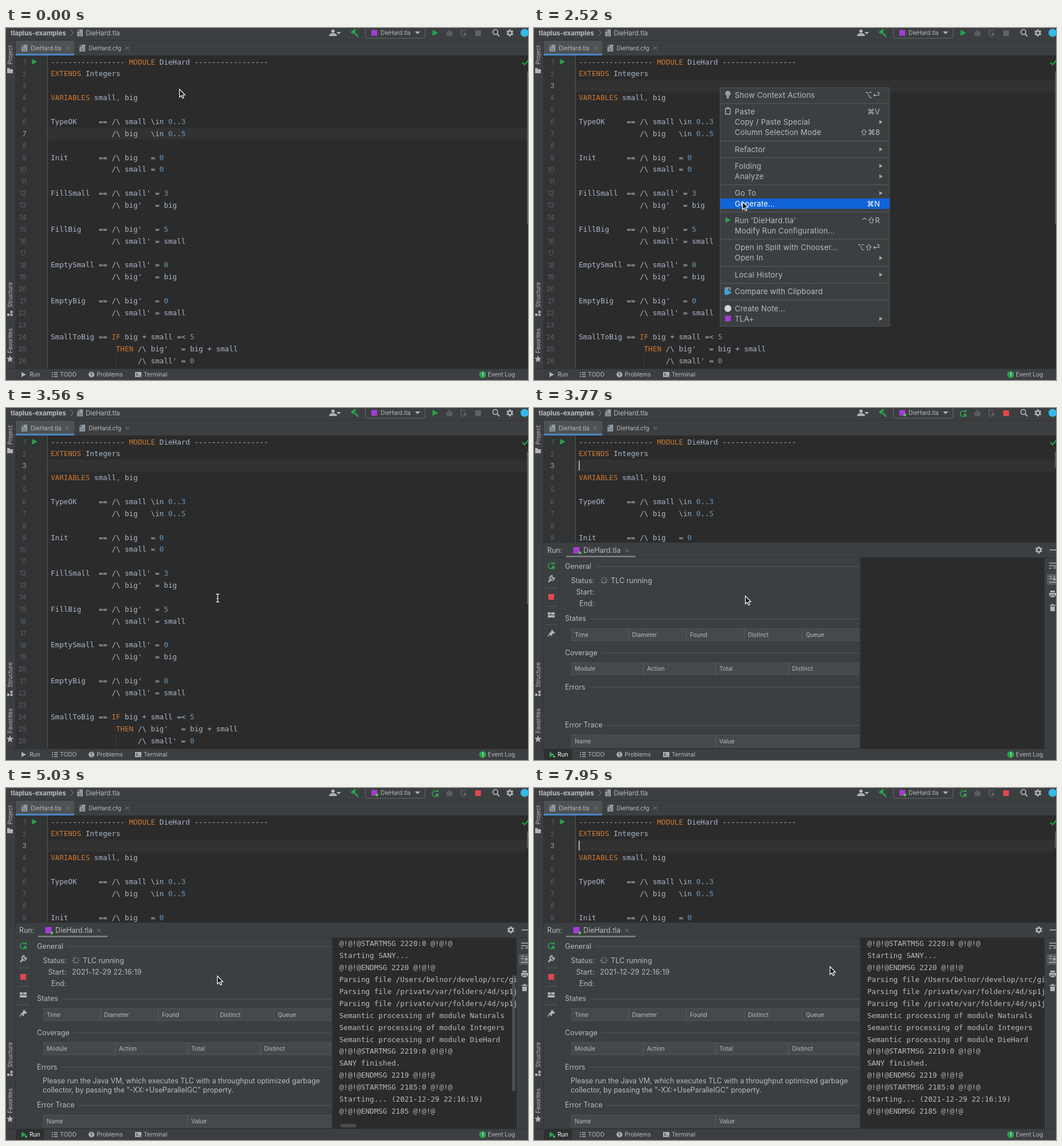
These frames come from a looping animation (910 by 615 pixels, 8 s). An HTML page:

```html
<!DOCTYPE html>
<html lang="en">
<head>
<meta charset="utf-8">
<title>TLA+ run</title>
<style>
html,body{margin:0;width:100%;height:100%;overflow:hidden;background:#3c3f41}
svg{display:block}
text{white-space:pre;font-family:Inter,'DejaVu Sans',sans-serif;fill:#bbbbbb}
.code,.code tspan{font-family:'DejaVu Sans Mono',monospace;font-size:12.6px;font-variant-ligatures:none}
</style>
</head>
<body>
<svg id="stage" width="910" height="615" viewBox="0 0 910 615" xmlns="http://www.w3.org/2000/svg"></svg>
<script>
const LOOP = 8000, STEP = 209.3, PITCH = 20.88;
const BG = '#2b2b2b', PANEL = '#3c3f41', EDGE = '#323232', RULE = '#55585a', ICON = '#afb1b3';
const GREEN = '#28a14e', RED = '#e0474c', DIM = '#5f6264', MARK = '#a53bd6';

const esc = s => s.replace(/&/g, '&amp;').replace(/</g, '&lt;');
const rect = (x, y, w, h, fill, extra = '') =>
  `<rect x="${x}" y="${y}" width="${w}" height="${h}" fill="${fill}" ${extra}/>`;
const fill = (d, color) => `<path d="${d}" fill="${color}"/>`;
const line = (d, color = ICON, w = 1.3) =>
  `<path d="${d}" fill="none" stroke="${color}" stroke-width="${w}"/>`;
const circle = (x, y, r, color) => `<circle cx="${x}" cy="${y}" r="${r}" fill="${color}"/>`;
const ring = (x, y, r, color = ICON, w = 1.4) =>
  `<circle cx="${x}" cy="${y}" r="${r}" fill="none" stroke="${color}" stroke-width="${w}"/>`;
// y is the middle of the capitals
const label = (x, y, s, size, color = '#bbbbbb', extra = '') =>
  `<text x="${x}" y="${(y + size * .36).toFixed(2)}" font-size="${size}" style="fill:${color}" ${extra}>${esc(s)}</text>`;
const group = (id, body, extra = '') => `<g id="${id}" ${extra}>${body}</g>`;
const at = (x, y, body) => `<g transform="translate(${x} ${y})">${body}</g>`;
const rowY = n => 59 + (n - 1) * PITCH;

const play = (x, y, s = 5) => fill(`M${x - s} ${y - s - .5}L${x + s} ${y}L${x - s} ${y + s + .5}Z`, GREEN);
const rerun = (x, y) => at(x, y,
  line('M4-2A5 5 0 1 0 4 4', GREEN, 1.7) + fill('M1-2H6V-7Z', GREEN) + rect(1, 1, 5, 5, GREEN));
const cross = (x, y) => line(`M${x - 3} ${y - 3}l6 6m0-6l-6 6`, '#7d8082', 1);
const page = (x, y) => at(x, y,
  fill('M-1-6H5V6H-5V-2H-1Z', '#8f9ba3') + fill('M-5-3L-2-6V-3Z', '#8f9ba3') +
  line('M-3 1H3M-3 3.5H3', '#59636a', 1));
const mark = (x, y, s) => rect(x - s / 2, y - s / 2, s, s, MARK);
const gear = (x, y) => at(x, y, ring(0, 0, 3.5, ICON, 2.6) +
  [0, 60, 120].map(a => `<path d="M0-6.2V-4M0 4V6.2" stroke="${ICON}" stroke-width="2.6" transform="rotate(${a})"/>`).join(''));

const source = `----------------- MODULE DieHard -----------------
EXTENDS Integers

VARIABLES small, big

TypeOK     == /\\ small \\in 0..3
              /\\ big   \\in 0..5

Init       == /\\ big   = 0
              /\\ small = 0

FillSmall  == /\\ small' = 3
              /\\ big'   = big

FillBig    == /\\ big'   = 5
              /\\ small' = small

EmptySmall == /\\ small' = 0
              /\\ big'   = big

EmptyBig   == /\\ big'   = 0
              /\\ small' = small

SmallToBig == IF big + small =< 5
               THEN /\\ big'   = big + small
                    /\\ small' = 0`.split('\n');

const tint = (s, color) => `<tspan style="fill:${color}">${s}</tspan>`;
const paint = s => esc(s).replace(/\d|\b(MODULE|EXTENDS|VARIABLES|IF|THEN)\b|,/g,
  m => tint(m, /\d/.test(m) ? '#6897bb' : '#cc7832'));
const codeText = (x, y, html, color) =>
  `<text class="code" x="${x}" y="${(y + 4.5).toFixed(2)}" style="fill:${color}">${html}</text>`;

function editor() {
  let s = rect(17, 48, 893, 548, BG) + rect(17, 48, 55, 548, '#313335') +
    group('row', rect(73, -10.4, 835, 20.9, EDGE)) + rect(72, 48, 1, 548, '#55585a');
  source.forEach((text, i) => {
    const y = rowY(i + 1);
    s += label(35.5, y + .5, String(i + 1), 11.5, '#606366', 'class="num" text-anchor="end"');
    s += codeText(78, y, paint(text), '#a9b7c6');
  });
  return s + play(50, 59, 4.5) + rect(191, 571, 1, 21, '#3b3d3e') +
    line('M900 60l4 4 7-8', GREEN, 2.2) + group('thumb', rect(908, 76, 2, 267, '#55585a')) +
    group('caret', rect(78, 92, 1.5, 17, '#d0d0d0'));
}

function topBar() {
  const bug = ring(773, 10, 3.4, DIM, 2.6) + line('M767 6l12 8m0-8l-12 8M767 10h12M771 3l2 3 2-3', DIM, 1);
  return rect(0, 0, 910, 48, PANEL) + rect(0, 21, 910, 1, EDGE) +
    label(8, 8.5, 'tlaplus-examples', 11.4, '#bbbbbb', 'font-weight="650"') +
    line('M113 3l4 5.5-4 5.5', '#85888a', 1) + page(129, 8.5) + label(139, 8.5, 'DieHard.tla', 11.3) +
    circle(570, 5.5, 3, ICON) + fill('M563 14q0-5 7-5t7 5Z', ICON) + fill('M576 7h8l-4 4Z', ICON) +
    fill('M601 7l6-5 4 1-3 4 7 7-2 2-7-7-2 2Z', GREEN) +
    rect(626.5, -4, 104, 22, PANEL, 'stroke="#65686a" rx="3"') + mark(642, 8.5, 10) +
    label(653, 8.5, 'DieHard.tla', 10) + fill('M713 6h9l-4.5 5Z', ICON) + bug +
    line('M802 4H793V9q0 4 4 6', DIM, 1.6) + fill('M798 7l6 4-6 4Z', DIM) +
    group('idle', play(748.5, 8.5, 5) + rect(818, 4, 10, 10, DIM)) +
    group('busy', rerun(748, 9) + rect(818, 4, 10, 10, RED) + circle(646.5, 12, 2.5, '#4cc24c')) +
    ring(853, 7, 4.3, ICON, 1.7) + line('M856 10l4 4.5', ICON, 2) + gear(878.5, 8.5) +
    circle(904, 8.5, 7, '#35b9e6') +
    rect(17, 22, 102, 26, '#4e5254') + rect(17, 45, 102, 3, '#4a88c7') +
    page(32, 35) + label(43, 35.5, 'DieHard.tla', 10.2) + cross(107, 35) +
    page(133, 35) + label(144, 35.5, 'DieHard.cfg', 10.1) + cross(211.5, 35);
}

function sideBar() {
  const side = (s, y) => at(7, y, `<g transform="rotate(-90)">${label(0, 0, s, 10.1, '#bbbbbb', 'text-anchor="middle"')}</g>`);
  return rect(0, 22, 17, 574, PANEL) + rect(16, 22, 1, 574, EDGE) +
    side('Project', 47) + fill('M2 70h4l1 2h5v7H2Z', ICON) +
    side('Structure', 466) + rect(2, 499, 4, 4, ICON) + rect(7.5, 499, 4, 4, ICON) + rect(7.5, 494, 4, 4, ICON) +
    side('Favorites', 546.5) + fill('M7 572l1.8 4.2 4.2.3-3.3 2.9 1.1 4.6-3.8-2.5-3.8 2.5 1.1-4.6L1 576.5l4.2-.3Z', ICON);
}

function bottomBar() {
  const y = 605.5;
  return rect(0, 596, 910, 19, PANEL) + rect(0, 595, 910, 1, EDGE) +
    group('runTab', rect(17, 596, 49, 19, '#2d2f30')) +
    fill('M27 601l8 4.5-8 4.5Z', ICON) + group('runDot', play(31, y, 4) + circle(35, 609, 2, '#4cc24c')) +
    label(41, y, 'Run', 10.2, '#bbbbbb', 'id="runLabel"') +
    line('M80 602h2m2 0h6M80 605.5h2m2 0h6M80 609h2m2 0h6', ICON, 1.4) + label(94, y, 'TODO', 10.1) +
    circle(149, y, 5, ICON) + rect(148.2, 602, 1.6, 4, PANEL) + rect(148.2, 607, 1.6, 1.6, PANEL) +
    label(158, y, 'Problems', 10.3) +
    rect(225, 601, 11, 9, ICON) + line('M227 603l2.5 2.5-2.5 2.5m4 0h3', PANEL, 1.1) + label(240, y, 'Terminal', 10.2) +
    circle(831, y, 6, GREEN) + label(831, y, '1', 9, '#ffffff', 'text-anchor="middle"') + label(840, y, 'Event Log', 10.1);
}

// y, text, shortcut ('>' means submenu)
const items = [
  [117, 'Show Context Actions', '⌥⏎'], [146, 'Paste', '⌘V'], [164.3, 'Copy / Paste Special', '>'],
  [182.5, 'Column Selection Mode', '⇧⌘8'], [212, 'Refactor', '>'], [241, 'Folding', '>'],
  [259.3, 'Analyze', '>'], [288.5, 'Go To', '>'], [307, 'Generate...', '⌘N'],
  [336, "Run 'DieHard.tla'", '⌃⇧R'], [354.3, 'Modify Run Configuration...', ''],
  [383.5, 'Open in Split with Chooser...', '⌥⇧⏎'], [401.7, 'Open In', '>'], [431, 'Local History', '>'],
  [460.5, 'Compare with Clipboard', ''], [490, 'Create Note...', ''], [508, 'TLA+', '>']];
const breaks = [132, 197.5, 226.5, 274, 321.5, 369, 416.5, 446, 475.5];

function menu() {
  let s = rect(324.5, 104.5, 295.5, 416.5, PANEL, 'stroke="#515456"') +
    breaks.map(y => rect(325, y - .5, 295, 1, '#5a5d5f')).join('') +
    rect(325, 0, 295, 18.2, '#1064d8', 'id="pick"');
  items.forEach(([y, text, key]) => {
    s += label(350, y, text, 13, '#bbbbbb', 'letter-spacing=".2" class="item"');
    s += key === '>' ? fill(`M602 ${y - 3.5}l6 3.5-6 3.5Z`, '#a0a2a4')
      : label(603, y, key, 13, '#bbbbbb', 'text-anchor="end"');
  });
  return s + circle(338, 114.5, 4.7, '#9da0a2') + rect(336, 119, 4, 4, '#9da0a2') +
    rect(334, 140.5, 8, 10, 'none', `stroke="${ICON}" stroke-width="1.4"`) + rect(336, 138.5, 4, 3, ICON) +
    play(338.5, 335.5, 4.5) +
    rect(332, 455, 7, 11, '#4a9cc7') + line('M333 454h9v5', ICON, 1.4) + fill('M338 458l7 4-7 4Z', '#4a9cc7') +
    circle(338, 490, 6, '#d8d8d8') + mark(338, 507.5, 10);
}

const output = `Please run the Java VM, which executes TLC
@!@!@ENDMSG 2401 @!@!@
@!@!@STARTMSG 2187:0 @!@!@
Running breadth-first search Model-Checking
@!@!@ENDMSG 2187 @!@!@
@!@!@STARTMSG 2220:0 @!@!@
Starting SANY...
@!@!@ENDMSG 2220 @!@!@
Parsing file /Users/belnor/develop/src/git
Parsing file /private/var/folders/4d/sp1j
Parsing file /private/var/folders/4d/sp1j
Semantic processing of module Naturals
Semantic processing of module Integers
Semantic processing of module DieHard
@!@!@STARTMSG 2219:0 @!@!@
SANY finished.
@!@!@ENDMSG 2219 @!@!@
@!@!@STARTMSG 2185:0 @!@!@
Starting... (2021-12-29 22:16:19)
@!@!@ENDMSG 2185 @!@!@`.split('\n');

function runPanel() {
  const T = 12.4;
  const head = (y, s, x) => label(54, y, s, T) + rect(x, y, 568 - x, 1, RULE);
  const table = (y, names, w) => rect(64, y - 11, 504, 22, '#45494b') +
    line(`M64 ${y - 10.5}H568M64 ${y + 10.5}H568`, '#505355', 1) +
    names.map((s, i) => {
      const x = Math.floor(64 + w * i);
      return (i ? rect(x, y - 11, 1, 22, '#5a5d5f') : '') + label(x + 7, y + .3, s, 10.2);
    }).join('');
  const field = (y, s) => label(105, y, s, T, '#bbbbbb', 'text-anchor="end"');
  const spokes = [...Array(8)].map((_, i) =>
    `<path class="spoke" d="M0-3V-6.5" stroke="#b4b6b8" stroke-width="1.5" transform="rotate(${i * 45})"/>`).join('');
  return rect(17, 235, 893, 360, PANEL) + rect(17, 234.5, 893, 1, EDGE) + rect(17, 261, 893, 1, EDGE) +
    label(23, 248.5, 'Run:', T) + mark(74, 248.5, 11) + circle(80, 253, 2.5, '#4cc24c') +
    label(86, 248.5, 'DieHard.tla', T) + cross(162, 249) + rect(56, 258, 121, 3, '#747a80') +
    gear(880, 248) + line('M899 248H910', ICON, 1.6) +
    rect(44, 262, 1, 333, '#36393b') +
    rerun(30, 275) + line('M25 304l5-5', ICON, 2.6) + line('M35.5 297a4 4 0 1 1-4-4v4Z', ICON, 2) +
    rect(21, 314, 19, 1, RULE) + rect(25, 325, 10, 10, RED) + rect(21, 346, 19, 1, RULE) +
    rect(24, 357, 5, 4, ICON) + rect(30, 357, 6, 4, ICON) + rect(24, 362, 12, 4, ICON) + rect(21, 378, 19, 1, RULE) +
    fill('M31 387l6 6-2 1-2 0-2 3 0 2-6-5 3-1 2-3Z', ICON) + line('M28 395l-4 4', ICON, 1.4) +
    head(276.5, 'General', 106) + field(301.5, 'Status:') + at(122, 301, spokes) + label(134, 301.5, 'TLC running', T) +
    field(321.5, 'Start:') + field(341.5, 'End:') +
    head(368, 'States', 98) + table(396, ['Time', 'Diameter', 'Found', 'Distinct', 'Queue'], 100.8) +
    head(427.5, 'Coverage', 117) + table(455.5, ['Module', 'Action', 'Total', 'Distinct'], 126.4) +
    head(487.5, 'Errors', 96) + head(554, 'Error Trace', 125) + table(582, ['Name', 'Value'], 252.5) +
    group('details', label(115, 321.5, '2021-12-29 22:16:19', T, '#bbbbbb',
        'font-variant-numeric="tabular-nums" font-feature-settings="\'tnum\'" letter-spacing=".18"') +
      label(64, 512, 'Please run the Java VM, which executes TLC with a throughput optimized garbage', T) +
      label(64, 527.3, 'collector, by passing the "-XX:+UseParallelGC" property.', T)) +
    rect(568, 262, 2, 333, EDGE) + rect(570, 262, 320, 333, BG) +
    '<g clip-path="url(#console)">' +
    group('log', output.map((s, i) => codeText(581, 272 + i * PITCH, esc(s), '#bbbbbb')).join('')) + '</g>' +
    group('bars', rect(882, 327, 6, 203, '#a6a6a6', 'rx="3"') + rect(583, 587, 28, 6, '#a6a6a6', 'rx="3"')) +
    line('M898 271h12M898 275.5h9q4 0 4 4h-6M898 280h4', ICON, 1.5) +
    rect(894, 290, 16, 19, '#55595c') + line('M898 304.5h12M898 294h5M898 298h5M907 293v8m-3-3l3 3 3-3', ICON, 1.4) +
    rect(898, 323, 12, 6, ICON) + rect(900, 319, 8, 3, ICON) + rect(900, 327, 8, 4, ICON, `stroke="${PANEL}"`) +
    rect(899, 344, 10, 1.8, ICON) + rect(902, 342.5, 4, 1.5, ICON) + rect(900, 347, 8, 8, ICON);
}

const pointers =
  group('arrow', '<path d="M0 0V13.8L3.2 10.9 5.3 15.8 7.6 14.8 5.5 10H9.6Z" fill="#111" stroke="#fff" stroke-width="1.2"/>') +
  group('beam', line('M-3-7q3 0 3 2V5q0 2-3 2M3-7q-3 0-3 2V5q0 2 3 2M-1.5 1h3', '#e8e8e8', 1.3));

document.getElementById('stage').innerHTML =
  '<defs><clipPath id="console"><rect x="570" y="262" width="320" height="333"/></clipPath></defs>' +
  editor() + topBar() + sideBar() + group('run', runPanel()) + bottomBar() + group('menu', menu()) + pointers;

const $ = id => document.getElementById(id);
const all = s => [...document.querySelectorAll(s)];
const show = (id, on) => $(id).setAttribute('display', on ? 'inline' : 'none');
const move = (id, x, y) => $(id).setAttribute('transform', `translate(${x} ${y})`);
const nums = all('.num'), names = all('.item'), spokes = all('.spoke');

// tick, x, y
const path = [[0, 302.5, 107], [3, 302.5, 107], [6, 323.5, 103.5], [8, 323.5, 103.5], [10, 350, 205],
  [11, 361, 282], [12, 363.5, 303.5], [13, 365.5, 318.5], [14, 368.5, 328.5], [35, 368.5, 328.5], [38, 516, 312]];
function pointer(k) {
  const i = Math.max(1, path.findIndex(p => p[0] >= k));
  const [a, b] = [path[i - 1], path[i]];
  const u = (k - a[0]) / (b[0] - a[0]);
  return [a[1] + (b[1] - a[1]) * u, a[2] + (b[2] - a[2]) * u];
}

function draw(t) {
  const k = Math.min(38, Math.floor((t + 5) / STEP));
  const [x, y] = pointer(k);
  const open = k >= 6 && k < 17, running = k >= 18;
  const row = k < 6 ? 7 : 3;

  move('row', 0, rowY(row));
  nums.forEach((n, i) => { n.style.fill = i + 1 === row ? '#a4a3a3' : '#606366'; });
  show('caret', running && (k * STEP) % 1000 >= 500);
  $('thumb').firstChild.setAttribute('height', running ? 28 : 267);

  show('menu', open);
  const hit = open && x > 325 ? items.findIndex(it => Math.abs(it[0] - y) < 9.2) : -1;
  show('pick', hit >= 0);
  if (hit >= 0) $('pick').setAttribute('y', items[hit][0] - 9.1);
  names.forEach((n, i) => {
    n.style.fill = i === hit ? '#ffffff' : '#bbbbbb';
    if (items[i][2] !== '>') n.nextElementSibling.style.fill = n.style.fill;
  });

  for (const id of ['run', 'busy', 'runTab', 'runDot']) show(id, running);
  show('idle', !running);
  $('runLabel').style.fill = running ? '#ffffff' : '#bbbbbb';
  show('details', k >= 19);
  show('log', k >= 19);
  move('log', 0, k >= 22 ? -5 * PITCH : 0);
  $('bars').setAttribute('opacity', k < 19 ? 0 : .4 * Math.max(0, Math.min(1, (26 - k) / 3)));
  const phase = Math.floor(k * STEP / 125) % 8;
  spokes.forEach((s, i) => s.setAttribute('opacity', .3 + .5 * ((i - phase + 8) % 8) / 7));

  show('beam', k === 17);
  show('arrow', k !== 17);
  move('beam', 369, 332);
  move('arrow', x, y);
}

const start = performance.now();
function frame() {
  draw((performance.now() - start) % LOOP);
  requestAnimationFrame(frame);
}
frame();
</script>
</body>
</html>
```
